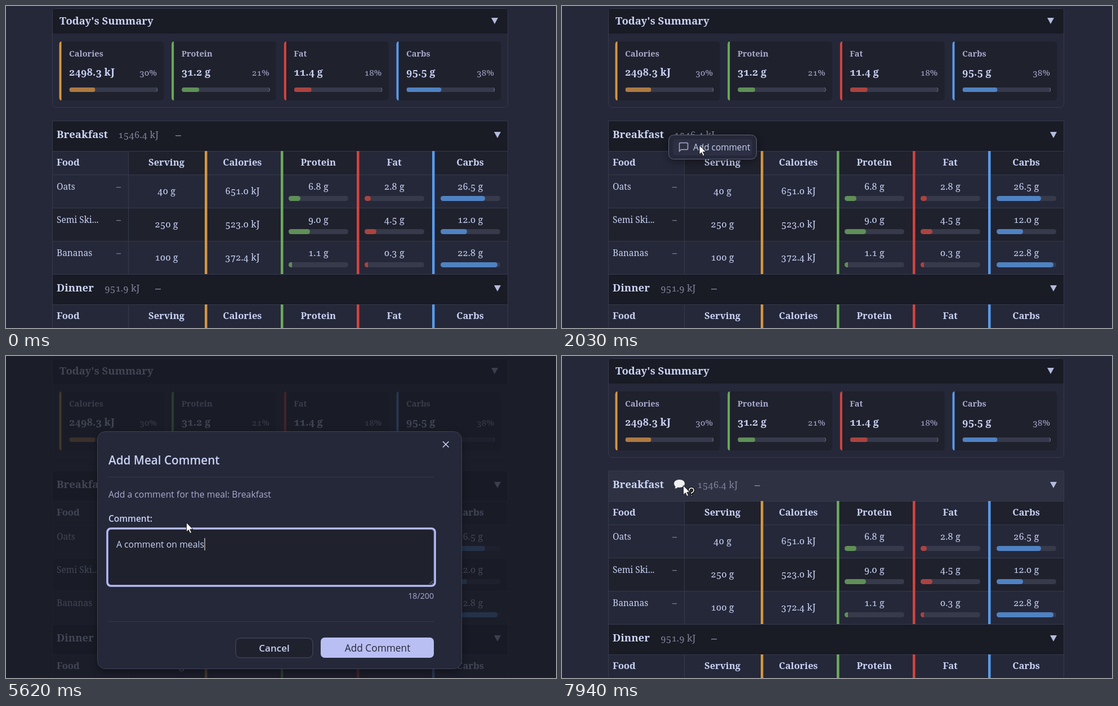
An HTML page for the animation above (8000 ms loop, 977x573 px).

```html
<!DOCTYPE html>
<html lang="en">
<head>
<meta charset="utf-8">
<title>Meal comment</title>
<style>
html, body { margin: 0; width: 100%; height: 100%; overflow: hidden; background: #252839; }
svg { display: block; width: 977px; height: 573px; }
text { white-space: pre; }
filter { color-interpolation-filters: sRGB; }
.serif { font-family: "Noto Serif", "Liberation Serif", serif; font-variant-numeric: oldstyle-nums; }
.sans { font-family: "Open Sans", "Noto Sans", sans-serif; }
</style>
</head>
<body>
<svg id="stage" viewBox="0 0 977 573"></svg>
<script>
const BASE = '#252839', DARK = '#1f212d', HEAD = '#191b25', LINE = '#363a4b', TEXT = '#cad3f5',
      SOFT = '#a9abce', MUTED = '#7f8299', LAVENDER = '#b9bff3';
const NUTRIENTS = [
  ['Calories', '#d6963f', '#ad7a41'],
  ['Protein', '#6cab5b', '#5f8f57'],
  ['Fat', '#d5433c', '#ab4340'],
  ['Carbs', '#5a9ae9', '#4f82c2'],
];

const rect = (x, y, w, h, fill, r = 0, more = '') =>
  `<rect x="${x}" y="${y}" width="${w}" height="${h}" rx="${r}" fill="${fill}" ${more}/>`;
const frame = (x, y, w, h, fill, stroke, r, more = '') =>
  rect(x + .5, y + .5, w - 1, h - 1, fill, r, `stroke="${stroke}" ${more}`);
const label = (s, x, y, size, fill, weight = 400, anchor = 'start', more = '') =>
  `<text x="${x}" y="${y}" font-size="${size}" fill="${fill}" font-weight="${weight}" text-anchor="${anchor}" ${more}>${s}</text>`;
const arrow = (x, y) => `<path d="M${x} ${y}h12l-6 11z" fill="#b4bbdc"/>`;
const bar = (x, y, w, h, part, color) =>
  rect(x, y, w, h, LINE, h / 2) +
  `<svg x="${x}" y="${y}" width="${part}" height="${h}" style="width:${part}px;height:${h}px">${rect(0, 0, Math.max(part, 9), h, color, h / 2)}</svg>`;

function summary() {
  const values = [['2498.3 kJ', 30, 46], ['31.2 g', 21, 31], ['11.4 g', 18, 31], ['95.5 g', 38, 62]];
  let s = frame(82, 4, 810, 177, BASE, LINE, 6) +
    `<path d="M83 49V10q0-5 5-5H886q5 0 5 5V49z" fill="${HEAD}"/>` +
    label("Today's Summary", 95, 33, 18.5, TEXT, 600) + arrow(862, 21);
  values.forEach(([value, pct, part], i) => {
    const [name, edge, fill] = NUTRIENTS[i], x = 94.5 + i * 199.65;
    s += rect(x, 63, 186, 105, DARK, 6) +
      `<path d="M${x + 4} 63v105q-4 0-4-6v-93q0-6 4-6z" fill="${edge}"/>` +
      label(name, x + 17.5, 90, 14.6, SOFT, 600) + label(value, x + 17.5, 124, 18, TEXT, 700) +
      label(pct + '%', x + 173.5, 124, 15, SOFT, 400, 'end') +
      rect(x + 166, 145, 8.5, 8, '#b4bbdc', 4) + rect(x + 165, 145, 8.7, 8, LINE, 4) +
      bar(x + 18, 145, 156, 8, part, fill);
  });
  return s;
}

const columnX = i => Math.round(353 + i * 134.8);
const center = i => 285 + i * 134.9;

function columns(y, striped) {
  let s = rect(83, y, 808, 43, BASE);
  if (striped) for (const i of [0, 2, 4]) s += rect(218 + i * 135, y, 135, 43, DARK);
  s += label('Food', 90, y + 26, 16.6, TEXT, 600);
  ['Serving', ...NUTRIENTS.map(n => n[0])].forEach((name, i) =>
    s += label(name, center(i), y + 26, 16.6, TEXT, 600, 'middle'));
  return s + rect(83, y, 808, 1, LINE);
}

const edges = (y, h) => rect(217, y, 1, h, LINE) +
  NUTRIENTS.map(([, edge], i) => rect(columnX(i), y, 4.5, h, edge)).join('');

function foodRow([name, serving, energy, ...macros], i) {
  const y = 300 + i * 59;
  let s = rect(83, y, 808, 59, i % 2 ? DARK : BASE) + rect(83, y, 808, 1, LINE) +
    label(name, 90, y + 27, 15.5, TEXT) + rect(196, y + 22, 8, 1.2, MUTED) +
    label(serving, center(0), y + 35, 16.3, TEXT, 500, 'middle') +
    label(energy, center(1), y + 35, 16.3, TEXT, 500, 'middle');
  macros.forEach(([grams, part], k) => {
    s += label(grams, center(k + 2), y + 27, 16.3, TEXT, 500, 'middle') +
      bar(502 + k * 135, y + 38, 106, 9, part, NUTRIENTS[k + 1][2]);
  });
  return s;
}

function table() {
  const foods = [
    ['Oats', '40 g', '651.0 kJ', ['6.8 g', 21], ['2.8 g', 11], ['26.5 g', 79]],
    ['Semi Ski...', '250 g', '523.0 kJ', ['9.0 g', 38], ['4.5 g', 21], ['12.0 g', 47]],
    ['Bananas', '100 g', '372.4 kJ', ['1.1 g', 6], ['0.3 g', 6], ['22.8 g', 101]],
  ];
  return rect(83, 204, 808, 54, HEAD, 0, 'id="mealHead"') +
    label('Breakfast', 90, 235, 18.6, TEXT, 600) +
    `<path id="bubble" d="M208.500 220c6 0 9.500 3 9.500 7s-4 7-9.500 7l-3-.3q-2 2-5 2 1-2 1-3.500-2.500-2-2.500-5.200c0-4 4-7 9.500-7z"/>` +
    `<g id="mealInfo">${label('1546.4 kJ', 199, 235, 16.6, MUTED)}${rect(301, 230, 10, 1.5, MUTED)}</g>` +
    arrow(867, 224) + columns(258, true) + foods.map(foodRow).join('') +
    rect(83, 477, 808, 54, HEAD) + rect(83, 477, 808, 1, LINE) +
    label('Dinner', 90, 508, 18.6, TEXT, 600) + label('951.9 kJ', 175, 508, 16.6, MUTED) +
    rect(265, 503, 10, 1.5, MUTED) + arrow(867, 497) + columns(531, false) +
    edges(258, 219) + edges(531, 42) + frame(82, 204, 810, 380, 'none', LINE, 0);
}

const menu = () => frame(189, 229, 157, 44, BASE, '#5f6379', 9, 'filter="url(#shadow)"') +
  rect(197, 237, 141, 29, '#2d3042', 5, 'id="menuItem"') +
  `<path d="M208.500 258.500v-13.500q0-1.500 1.500-1.500h12q1.500 0 1.500 1.500v9q0 1.500-1.500 1.500h-10.500z" fill="none" stroke="${SOFT}" stroke-width="1.500"/>` +
  label('Add comment', 233, 257, 15.4, TEXT);

const dialog = () => frame(162, 134, 648, 423, BASE, '#3f4357', 14, 'filter="url(#shadow)"') +
  label('Add Meal Comment', 182, 193, 20.7, TEXT, 600) +
  `<path d="M776 152l10.500 10.500m0-10.500l-10.500 10.500" stroke="${TEXT}" stroke-width="1.600"/>` +
  rect(182, 215, 578, 1, LINE) + rect(182, 472, 578, 1, LINE) +
  label('Add a comment for the meal: Breakfast', 182, 252, 15.8, SOFT) +
  label('Comment:', 182, 295, 15.5, TEXT, 600) +
  frame(181, 308, 579, 100, DARK, '#41455a', 6) +
  `<g id="focus">${rect(180, 307, 582, 102, 'none', 6, `stroke="${LAVENDER}" stroke-width="3.500"`)}${rect(181.5, 308.5, 579, 99, 'none', 5, 'stroke="#8087c8"')}</g>` +
  '<path d="M752 406l6-6m-2 6l2-2" stroke="#8a8da0"/>' +
  label('e.g., "Post-workout meal" or "High protein breakfast"', 196, 341, 15.8, '#4b4f63', 400, 'start', 'id="hint"') +
  label('', 196, 341, 15.8, TEXT, 400, 'start', 'id="typed"') + rect(0, 324, 1, 22, '#fff', 0, 'id="caret"') +
  label('0/200', 760, 432, 14.2, SOFT, 400, 'end', 'id="count"') +
  rect(408, 502, 137, 35, DARK, 8, 'stroke="#363a4f" stroke-width="2"') +
  label('Cancel', 476.5, 526, 17, TEXT, 600, 'middle') +
  `<g id="submit">${rect(559, 501, 201, 36, LAVENDER, 7)}${label('Add Comment', 660, 526, 17.3, '#252839', 500, 'middle')}</g>`;

const pointers = () => {
  const question = 'd="M11 9q0-4 4-4t4 4q0 3-4 4.500v1m0 3.500v.1"';
  return `<g stroke="#111" stroke-width=".9">
  <path id="arrowCursor" fill="#fff" d="M.5 .5v16.500l3.800-3.600 2.700 6 2.600-1.200-2.700-5.800h5.200z"/>
  <g id="helpMark" fill="none" stroke-linecap="round"><path ${question} stroke-width="4.200"/>
    <path ${question} stroke="#fff" stroke-width="1.600"/></g>
  <path id="handCursor" fill="#fff" d="M-2.500 10V0q0-2 1.600-2t1.600 2v6q0-1.500 1.700-1.500t1.700 2q0-1.500 1.600-1.500t1.600 2q0-1 1.400-1t1.400 2v5q0 5-3 6.500h-6q-2-1-3.500-4l-4-5q-1.500-2 0-2.600t3.900 2.600z"/>
</g>`;
};

const stage = document.getElementById('stage');
stage.innerHTML = `<defs><filter id="shadow" x="-20%" y="-40%" width="140%" height="180%">
    <feDropShadow dx="0" dy="5" stdDeviation="7" flood-color="#000" flood-opacity=".35"/></filter>
    <filter id="glow" x="-20%" y="-60%" width="140%" height="220%">
    <feDropShadow dx="0" dy="2" stdDeviation="4" flood-color="${LAVENDER}" flood-opacity=".3"/></filter></defs>
  ${rect(0, 0, 977, 573, BASE)}
  <g class="serif">${summary()}${table()}</g>
  <g class="sans"><g id="menu">${menu()}</g>
    <g id="modal">${rect(0, 0, 977, 573, '#181a25', 0, 'opacity=".77"')}${dialog()}</g></g>
  <circle id="click" r="12" fill="#a39a1c"/>
  <g id="pointer">${pointers()}</g>`;
const ui = {};
stage.querySelectorAll('[id]').forEach(e => ui[e.id] = e);

const COMMENT = 'A comment on meals';
const KEYS = [3160, 3490, 3620, 3840, 4110, 4200, 4295, 4390, 4485, 4580, 4780, 4980, 5070, 5160, 5250, 5430, 5525, 5620];
// time, x, y
const PATH = [
  [730, 43, 313], [1080, 189, 229], [1540, 189, 229], [1760, 240, 245], [1970, 240, 245], [2450, 320, 296],
  [6150, 320, 296], [6690, 615, 512], [7090, 615, 512], [7370, 46, 375], [7460, 34, 345], [7620, 85, 285], [7900, 215, 230],
];
const ramp = (t, a, b) => Math.min(1, Math.max(0, (t - a) / (b - a)));
const within = (t, a, b) => t >= a && t < b;
const show = (e, on) => e.setAttribute('display', on ? 'inline' : 'none');
const mix = (a, b, k) => `rgb(${a.map((v, i) => Math.round(v + (b[i] - v) * k))})`;

function position(t) {
  const i = PATH.findIndex(p => p[0] > t);
  if (i < 1) return PATH[i < 0 ? PATH.length - 1 : 0].slice(1);
  const [t0, x0, y0] = PATH[i - 1], [t1, x1, y1] = PATH[i], k = ramp(t, t0, t1), e = k * k * (3 - 2 * k);
  return [x0 + (x1 - x0) * e, y0 + (y1 - y0) * e];
}

function draw(t) {
  const saved = t >= 7090;
  const hover = saved ? ramp(t, 7680, 7880) : ramp(t, 980, 1130) - ramp(t, 1540, 1740);
  ui.mealHead.setAttribute('fill', mix(saved ? [33, 35, 48] : [25, 27, 37], [46, 49, 66], hover));
  show(ui.bubble, saved);
  ui.bubble.setAttribute('fill', mix([205, 206, 212], [240, 240, 242], hover));
  ui.mealInfo.setAttribute('transform', `translate(${saved ? 41 : 0} 0)`);

  show(ui.menu, within(t, 1200, 2040));
  show(ui.menuItem, t >= 1600);

  const open = ramp(t, 2040, 2360) - ramp(t, 7090, 7230);
  show(ui.modal, open > 0);
  ui.modal.setAttribute('opacity', open);
  const n = KEYS.filter(k => k <= t).length, focused = t < 6830;
  ui.typed.textContent = COMMENT.slice(0, n);
  ui.count.textContent = n + '/200';
  show(ui.hint, !n);
  show(ui.focus, focused);
  const lastKey = n ? KEYS[n - 1] : 1970;
  show(ui.caret, focused && (t - lastKey) % 1060 < 530);
  ui.caret.setAttribute('x', 196.5 + (n && open > 0 ? ui.typed.getComputedTextLength() : 0));

  const [x, y] = position(t);
  const onButton = within(t, 6150, 7090) && x > 559 && y > 500;
  ui.submit.setAttribute('transform', `translate(0 ${onButton ? -1 : 0})`);
  ui.submit.setAttribute('filter', onButton ? 'url(#glow)' : 'none');

  show(ui.pointer, t >= 730);
  ui.pointer.setAttribute('transform', `translate(${x} ${y})`);
  show(ui.handCursor, onButton);
  show(ui.arrowCursor, !onButton);
  show(ui.helpMark, t > 7860);
  show(ui.click, within(t, 1120, 1260) || within(t, 1830, 1980) || within(t, 6830, 6960));
  ui.click.setAttribute('cx', x);
  ui.click.setAttribute('cy', y);
}

function tick() {
  draw(performance.now() % 8000);
  requestAnimationFrame(tick);
}
tick();
</script>
</body>
</html>
```
